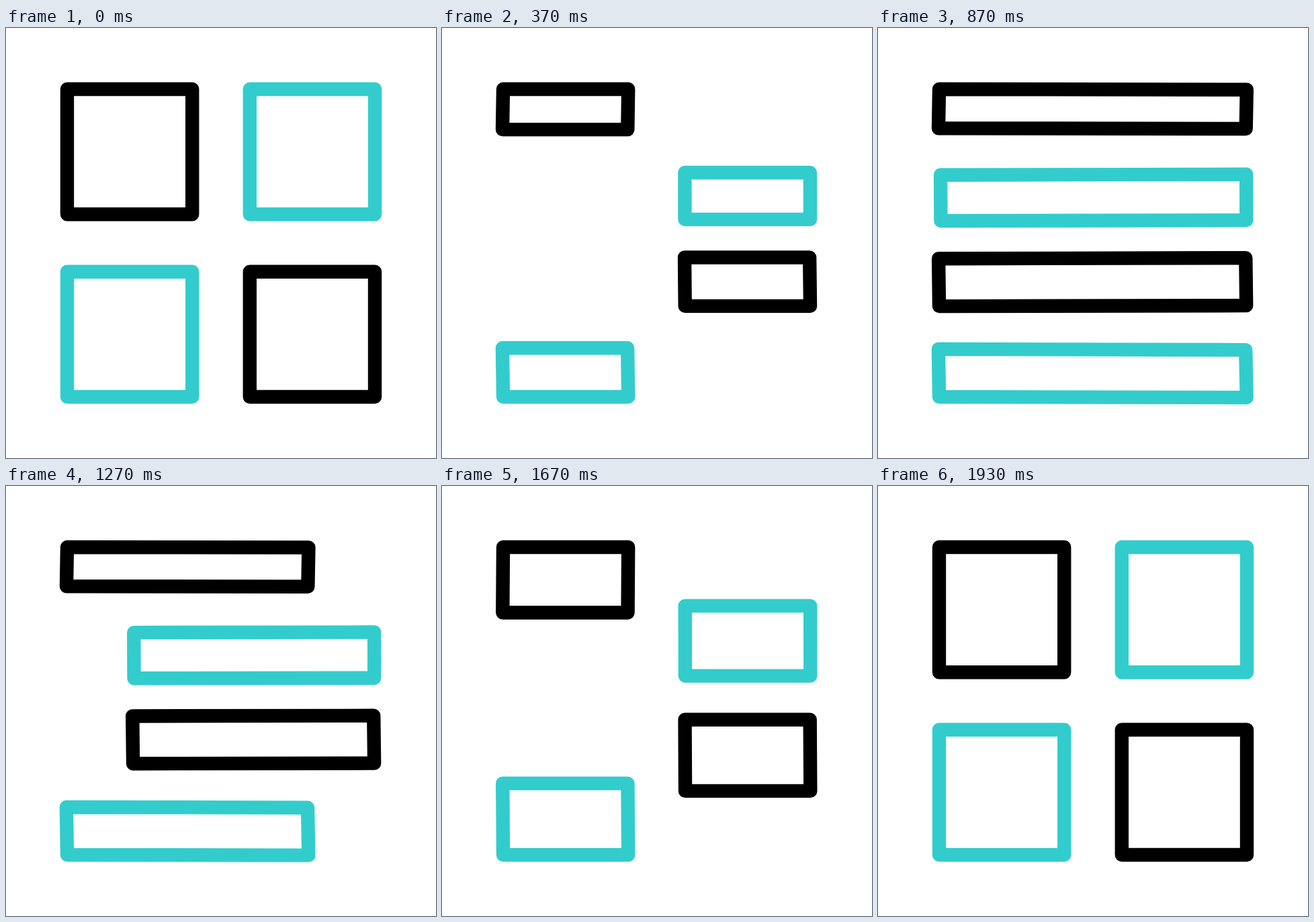
Write an HTML page without scripts that moves like this. It is 640 px wide and 640 px high and loops after 2 s.

```html
<!DOCTYPE html>
<html lang="en">
<head>
<meta charset="utf-8">
<title>Grid to list</title>
<style>
  html, body {
    margin: 0;
    width: 100%;
    height: 100%;
    overflow: hidden;
    background: #fff;
  }
  svg {
    display: block;
    width: 100%;
    height: 100%;
  }
  path {
    fill: none;
    stroke: #000;
    stroke-width: 20.4;
    stroke-linejoin: round;
    d: var(--tile);
    animation: morph 2s cubic-bezier(.3333, 0, .6667, 1) infinite;
  }
  .teal { stroke: #3cc; }

  /* tile: square, slim: flattened, bar: full width */
  .row1 {
    --tile: path("M91 91L277.2 91L277.2 277.2L91 277.2Z");
    --slim: path("M91 91L277.2 91L276.3 149.2L90 149.2Z");
    --bar: path("M91 91L548.8 91.8L547.7 150L90 149.2Z");
  }
  .row2 {
    --tile: path("M362.8 91L549 91L549 277.2L362.8 277.2Z");
    --slim: path("M361.3 217.1L547.8 217.1L548 285L361.5 285Z");
    --bar: path("M93.1 218.7L548.2 217.8L548.3 286.1L93.4 287Z");
  }
  .row3 {
    --tile: path("M91 362.8L277.2 362.8L277.2 549L91 549Z");
    --slim: path("M89.9 478L276.1 478L277.2 549L91 549Z");
    --bar: path("M89.9 477.9L547.2 479.1L548.7 550L91 549Z");
  }
  .row4 {
    --tile: path("M362.8 362.8L549 362.8L549 549L362.8 549Z");
    --slim: path("M361 341.1L547.1 341.1L548 411.8L361.7 411.8Z");
    --bar: path("M90.1 343.2L547.3 342.2L548.2 413.1L91 414.1Z");
  }

  @keyframes morph {
    0%, 96.5%, 100% { d: var(--tile); }
    20%, 76% { d: var(--slim); }
    43%, 55% { d: var(--bar); }
  }
</style>
</head>
<body>
<svg viewBox="0 0 640 640">
  <path class="row1"/>
  <path class="row2 teal"/>
  <path class="row3 teal"/>
  <path class="row4"/>
</svg>
</body>
</html>
```
